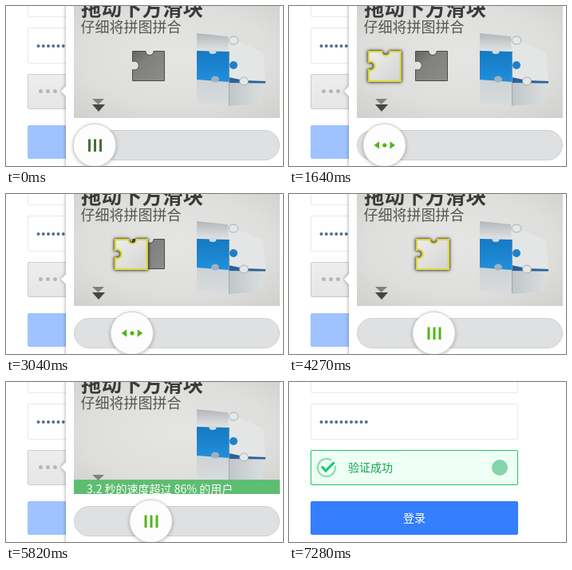
Write an HTML page that moves like this. It is 347 px wide and 200 px high and loops after 7.36 s.

```html
<!DOCTYPE html>
<html lang="zh-CN">
<head>
<meta charset="utf-8">
<title>滑块验证</title>
<style>
  html, body { margin: 0; width: 100%; height: 100%; overflow: hidden; background: #fff; }
  svg { display: block; width: 100vw; height: 100vh; }
  text { font-family: "Noto Sans CJK SC", "Noto Sans CJK", "Noto Sans", sans-serif; font-size: 14px; }
  #piece { filter: drop-shadow(0 0 1.5px rgba(0,0,0,.8)) drop-shadow(0 0 2px rgba(0,0,0,.5)); }
  #knob { filter: drop-shadow(0 1px 2px rgba(0,0,0,.28)); }
  #popupBox { filter: drop-shadow(0 0 2px rgba(0,0,0,.4)); }
</style>
</head>
<body>
<svg viewBox="0 0 347 200">
  <defs>
    <linearGradient id="grey" x2="0" y2="1">
      <stop stop-color="#eeeeee"/><stop offset="1" stop-color="#e6e6e6"/>
    </linearGradient>
    <radialGradient id="paper" cx=".5" cy=".45" r=".75">
      <stop stop-color="#e5e5e3"/><stop offset=".6" stop-color="#dededc"/><stop offset="1" stop-color="#cfcfcc"/>
    </radialGradient>
    <linearGradient id="holeFill" x2="1" y2="1">
      <stop stop-color="#636361"/><stop offset=".35" stop-color="#80807e"/><stop offset="1" stop-color="#8c8c8a"/>
    </linearGradient>
    <linearGradient id="pieceFill" x2="1" y2="1">
      <stop stop-color="#eeeeec"/><stop offset="1" stop-color="#d3d3d1"/>
    </linearGradient>
    <linearGradient id="lid" x2="0" y2="1">
      <stop stop-color="#b2b6b8"/><stop offset="1" stop-color="#e3e7e8"/>
    </linearGradient>
    <linearGradient id="blue" x2="0" y2="1">
      <stop stop-color="#1679c2"/><stop offset="1" stop-color="#218fdc"/>
    </linearGradient>
    <linearGradient id="base" x2="0" y2="1">
      <stop stop-color="#cdd2d4"/><stop offset="1" stop-color="#d9dcdd"/>
    </linearGradient>
    <linearGradient id="side">
      <stop stop-color="#c0c6c9"/><stop offset="1" stop-color="#dcdfdf"/>
    </linearGradient>
    <path id="jigsaw" d="M0 0H16.5A5 5 0 0 0 26.5 0H40V37H0V23A5.5 5.5 0 1 0 0 13Z"/>
    <clipPath id="imageClip"><rect x="85" width="258" height="140"/></clipPath>
    <clipPath id="sweepClip"><rect id="sweep" x="26" y="84" width="262" height="46"/></clipPath>
  </defs>

  <g fill="#fff" stroke="#e6e8eb">
    <rect x="27.5" y="-30.5" width="259" height="44" rx="1.5"/>
    <rect x="27.5" y="27.5" width="259" height="44" rx="1.5"/>
  </g>
  <path d="M40.5 50H98" stroke="#56708c" stroke-width="4" stroke-linecap="round" stroke-dasharray="0 6.25"/>
  <rect x="27.5" y="85.5" width="259" height="43" rx="1.5" fill="url(#grey)" stroke="#cbcbcb"/>
  <path id="waiting" d="M43.5 106.5H62" stroke="#b5b8bb" stroke-width="5" stroke-linecap="round" stroke-dasharray="0 9"/>
  <rect id="button" x="27" y="149" width="260" height="42" rx="2" fill="#347eff"/>
  <text x="157" y="175" text-anchor="middle" fill="#fff">登录</text>

  <g id="success" clip-path="url(#sweepClip)">
    <rect x="27.5" y="85.5" width="259" height="43" rx="1.5" fill="#eefff5" stroke="#26c267"/>
    <g fill="none">
      <path d="M53 97.8A11 11 0 1 0 57.7 104.5" stroke="#8fdcb1" stroke-width="2.2"/>
      <path id="check" d="M41 105.5L46 111L56.5 100.5" stroke="#1bc56a" stroke-width="3" pathLength="1"/>
    </g>
    <text x="74" y="112" fill="#18a452">验证成功</text>
    <circle cx="264" cy="107" r="10" fill="#84d5aa"/>
  </g>

  <g id="popup">
    <path id="popupBox" d="M75-10H360V210H75V113L69 106.5L75 100Z" fill="#fff"/>
    <g clip-path="url(#imageClip)">
      <rect x="85" width="258" height="140" fill="url(#paper)"/>
      <text x="94" y="11.5" fill="#3a3a39" style="font-size:25.5px;font-weight:700">拖动下方滑块</text>
      <text x="93.5" y="33" fill="#555553" style="font-size:18px">仔细将拼图拼合</text>
      <path d="M108 116H123L115.5 123Z" fill="#81817f"/>
      <path d="M108 123H124L116 132Z" fill="#454544"/>

      <g id="cube">
        <path d="M279 39L322 58L325 93L279 92Z" fill="#e4e6e5"/>
        <path d="M239 34L278 38V58L239 56Z" fill="url(#lid)"/>
        <path d="M279 95L325 96L319 122L279 125Z" fill="url(#side)"/>
        <path d="M239 91L279 94V125L239 121Z" fill="url(#base)"/>
        <path d="M239 56L280 57V95L239 92Z" fill="url(#blue)"/>
        <path d="M279 89L298 93L325 94V96.5L279 96Z" fill="#2a6299"/>
        <circle cx="285" cy="74" r="5" fill="#2180c6"/>
        <ellipse cx="262" cy="91.5" rx="5" ry="4" fill="#9fb2c0"/>
        <ellipse cx="259" cy="57" rx="4.5" ry="3" fill="#d3dadd"/>
        <g fill="#e4e7e7" stroke="#8d989f" stroke-width=".7">
          <ellipse cx="285" cy="43" rx="6" ry="5"/>
          <ellipse cx="298" cy="94" rx="5.5" ry="5"/>
        </g>
        <path d="M279.5 58V124" stroke="#93a0a9" stroke-width=".8"/>
      </g>

      <g id="puzzle">
        <use id="hole" href="#jigsaw" x="158.5" y="56.5" fill="url(#holeFill)" stroke="#4c4c4b"/>
        <g id="piece"><use href="#jigsaw" fill="url(#pieceFill)" stroke="#dcd838" stroke-width="2.2"/></g>
      </g>
      <g id="bar">
        <rect x="85" width="258" height="24" fill="#5dbd70"/>
        <text x="101" y="17" fill="#fff">3.2 秒的速度超过 86% 的用户</text>
      </g>
    </g>
    <rect x="85.5" y="155.5" width="257" height="37" rx="18.5" fill="#dfe0e2" stroke="#d0d1d3"/>
    <text id="hint" x="149.5" y="179" fill="#88949d">拖动左边滑块完成上方拼图</text>
    <g id="knob">
      <circle r="26.7" fill="#fdfdfd" stroke="#d2d2d2"/>
      <path id="lines" d="M-6.5-7.5V8M.5-7.5V8M7.5-7.5V8" stroke-width="3"/>
      <path id="arrows" d="M-13 0L-6.5-4.7V4.7ZM13.5 0L7-4.7V4.7ZM-2.3 0A2.6 2.6 0 1 0 2.9 0A2.6 2.6 0 1 0-2.3 0Z" fill="#52b51a"/>
    </g>
  </g>
</svg>
<script>
const LOOP = 7360;
const $ = id => document.getElementById(id);
const set = (id, name, value) => $(id).setAttribute(name, value);
const show = (id, on) => set(id, 'visibility', on ? 'inherit' : 'hidden');
const ramp = (t, from, to) => Math.min(1, Math.max(0, (t - from) / (to - from)));
const easeOut = p => 1 - (1 - p) ** 1.5;

// A hesitant start, a slow drag, then a quick run to the hole.
const travel = t =>
  2 * ramp(t, 1030, 1330) + 6.5 * ramp(t, 1330, 1640) + 9 * ramp(t, 1640, 2430) +
  33 * ramp(t, 2430, 3120) + 20 * ramp(t, 3120, 3600);

function draw(t) {
  const moved = travel(t);
  const dragging = t >= 250 && t < 4270;
  const solved = ramp(t, 4290, 4580);
  const barShown = solved - ramp(t, 5770, 5970);
  const accepted = ramp(t, 6300, 6820);

  set('knob', 'transform', `translate(${111 + moved} 174)`);
  set('piece', 'transform', `translate(${91.5 + moved * .97} 57)`);
  set('piece', 'opacity', ramp(t, 220, 420));
  set('puzzle', 'opacity', 1 - solved);
  set('hint', 'opacity', .75 * (ramp(t, 220, 550) - ramp(t, 1000, 1330)));
  set('bar', 'transform', `translate(0 ${140 - 24 * barShown})`);
  set('lines', 'stroke', t < 250 ? '#4c6a3d' : '#52b51a');
  show('lines', !dragging);
  show('arrows', dragging);
  show('hole', t < 4270);
  show('popup', t < 6130);
  show('waiting', t < 6130);
  show('success', t >= 6360);
  set('sweep', 'width', 262 * easeOut(accepted));
  set('check', 'stroke-dasharray', `${t < 7280 ? .9 : 1} 2`);
  set('button', 'fill-opacity', .465 + .535 * ramp(t, 6360, 6600));
}

const began = performance.now();
function tick() {
  draw((performance.now() - began) % LOOP);
  requestAnimationFrame(tick);
}
tick();
</script>
</body>
</html>
```
